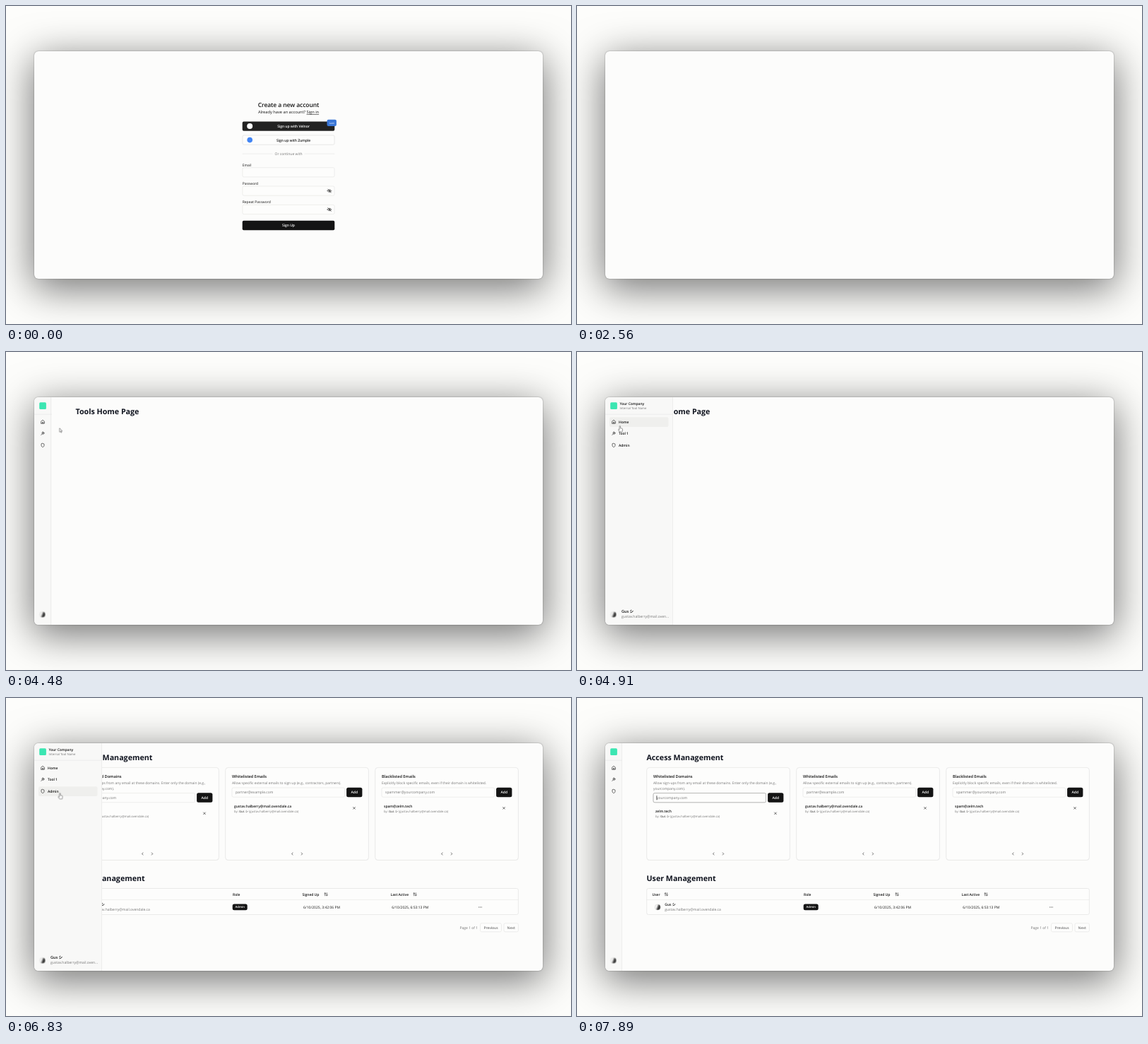
An HTML page for the animation above (8000 ms loop, 800x450 px).

```html
<!DOCTYPE html>
<html lang="en">
<head>
<meta charset="utf-8">
<title>Account sign-up</title>
<style>
html, body { margin: 0; width: 100%; height: 100%; overflow: hidden; background: #fdfdfb; }
.stage { position: relative; width: 800px; height: 450px; overflow: hidden; }
.window {
  position: absolute; left: 40px; top: 64px; width: 720px; height: 322px; border-radius: 6px;
  background: #fcfcfb;
  box-shadow: 0 12px 56px 2px rgba(0,0,0,.55), 0 0 2px rgba(0,0,0,.4);
}
svg { position: absolute; left: 0; top: 0; }
text {
  font-family: "Open Sans", "Noto Sans", "Noto Sans CJK JP", "Noto Sans CJK", sans-serif;
  font-size: 5px; fill: #161616; text-rendering: geometricPrecision; white-space: pre;
}
.b { font-weight: 600; letter-spacing: -.01em; }
.h { font-weight: 700; font-size: 10.7px; fill: #10141f; }
.t { font-size: 5.65px; }
.s { font-size: 4.25px; }
.g { fill: #737373; }
.w { fill: #fff; }
.m { text-anchor: middle; }
.field { fill: #fdfdfc; stroke: #e2e2e1; stroke-width: .6; }
.rule { stroke: #e4e4e3; stroke-width: .6; }
.ink { fill: #141414; }
.icon { fill: none; stroke: #222; stroke-width: .65; stroke-linecap: round; stroke-linejoin: round; }

/* one shared 8 s timeline: 1% = 80 ms */
.a { animation: 8s step-end infinite; }
.form { animation-name: form; }
.idle { animation-name: idle; animation-timing-function: linear; }
.busy { animation-name: busy; animation-timing-function: linear; }
.wait { animation-name: wait; }
.app { animation-name: app; }
.late { animation-name: late; animation-timing-function: linear; }
.home { animation-name: home; }
.admin { animation-name: admin; }
.rows { animation-name: rows; }
.hover { animation-name: hover; }
.focus { animation-name: focus; }
.open { animation-name: open; }
.edge { animation-name: edge; }
.label { animation-name: label; animation-timing-function: linear; }
.move { animation-name: move; }
.arrow { animation-name: arrow; }
.hand { animation-name: hand; }
.beam { animation-name: beam; }
.spin { animation: spin 1s linear infinite; }

@keyframes spin { to { transform: rotate(360deg); } }
@keyframes form { 0% { opacity: 1; } 26.875%, 100% { opacity: 0; } }
@keyframes idle { 0%, 9.3% { opacity: 1; } 10.6%, 100% { opacity: 0; } }
@keyframes busy { 0%, 9.3% { opacity: 0; } 10.6%, 100% { opacity: 1; } }
@keyframes wait { 0% { opacity: 0; } 26.875% { opacity: 1; } 32%, 100% { opacity: 0; } }
@keyframes app { 0% { opacity: 0; } 36.625%, 100% { opacity: 1; } }
@keyframes late { 0%, 39.3% { opacity: 0; } 40.6%, 100% { opacity: 1; } }
@keyframes home { 0% { opacity: 0; } 36.625% { opacity: 1; } 80%, 100% { opacity: 0; } }
@keyframes admin { 0% { opacity: 0; } 80%, 100% { opacity: 1; } }
@keyframes rows { 0% { opacity: 0; } 81.375%, 100% { opacity: 1; } }
@keyframes hover {
  0% { opacity: 0; transform: translateY(0); }
  56.5% { opacity: 1; transform: translateY(0); }
  64.2% { opacity: 1; transform: translateY(16.5px); }
  65.9% { opacity: 1; transform: translateY(33px); }
  90.2%, 100% { opacity: 0; transform: translateY(33px); }
}
@keyframes focus { 0% { opacity: 0; } 96%, 100% { opacity: 1; } }
@keyframes open {
  0% { width: 24px; }
  56% { width: 24px; animation-timing-function: ease-in-out; }
  58.8% { width: 96px; }
  91.2% { width: 96px; animation-timing-function: ease-in-out; }
  94.4%, 100% { width: 24px; }
}
@keyframes edge {
  0% { transform: translateX(0); }
  56% { transform: translateX(0); animation-timing-function: ease-in-out; }
  58.8% { transform: translateX(72px); }
  91.2% { transform: translateX(72px); animation-timing-function: ease-in-out; }
  94.4%, 100% { transform: translateX(0); }
}
@keyframes label { 0%, 56.2% { opacity: 0; } 58.8%, 91.2% { opacity: 1; } 94%, 100% { opacity: 0; } }
@keyframes move {
  0% { transform: translate(370.5px, 169.3px); }
  48% { transform: translate(360px, 166.8px); animation-timing-function: ease-in-out; }
  57.5% { transform: translate(61px, 104.6px); }
  62.5% { transform: translate(61px, 104.6px); animation-timing-function: ease-in-out; }
  67.8% { transform: translate(76.5px, 134.6px); }
  85.375% { transform: translate(76.5px, 134.6px); animation-timing-function: ease-in-out; }
  95%, 100% { transform: translate(196px, 141px); }
}
@keyframes arrow {
  0% { opacity: 0; } 6% { opacity: 1; } 26.875% { opacity: 0; }
  48% { opacity: 1; } 56.5% { opacity: 0; } 90.2% { opacity: 1; } 92.4%, 100% { opacity: 0; }
}
@keyframes hand { 0% { opacity: 0; } 56.5% { opacity: 1; } 90.2%, 100% { opacity: 0; } }
@keyframes beam { 0% { opacity: 0; } 92.4% { opacity: 1; } 96%, 100% { opacity: 0; } }
</style>
</head>
<body>
<div class="stage">
<div class="window"></div>
<svg width="800" height="450" viewBox="0 0 800 450">
  <defs>
    <clipPath id="side"><rect class="a open" x="40" y="64" width="24" height="322"/></clipPath>
    <linearGradient id="tone" x1="0" y1="0" x2="1" y2=".4">
      <stop offset=".4" stop-color="#f4f4f3"/>
      <stop offset=".75" stop-color="#3a3a3a"/>
    </linearGradient>
    <g id="eye" class="icon">
      <path d="M-2.8 0C-1.5-2.3 1.5-2.3 2.8 0C1.5 2.3-1.5 2.3-2.8 0zM-2.3-2.4L2.3 2.4"/>
      <circle r=".9"/>
    </g>
    <path id="ring" fill="none" stroke-width=".7" stroke-linecap="round" d="M2.2 1.1A2.45 2.45 0 1 1 1.1 2.2"/>
    <path id="sort" class="icon" d="M-1.2 2V-2M-2.2-1L-1.2-2L-.2-1M1.3-2V2M.3 1L1.3 2L2.3 1"/>
    <path id="cross" class="icon" d="M-1.4-1.4L1.4 1.4M1.4-1.4L-1.4 1.4"/>
    <circle id="face" r="4" fill="url(#tone)" stroke="#c4c4c3" stroke-width=".4"/>
    <g id="panel">
      <rect x="98.7" y="98.9" width="202.8" height="131.2" rx="4" fill="#000" opacity=".05"/>
      <rect class="field" x="98.7" y="98.4" width="202.7" height="131" rx="4" style="stroke:#dededd"/>
      <path class="icon" d="M194-1.5L192.6 0L194 1.5M206.3-1.5L207.7 0L206.3 1.5" transform="translate(0 220.5)"/>
    </g>
    <g id="adder">
      <rect class="field" x="108" y="134.6" width="159.6" height="13.2" rx="2"/>
      <rect class="ink" x="270.1" y="134.3" width="22.3" height="13.5" rx="2.5"/>
      <text class="b w m" x="281.3" y="142.9">Add</text>
    </g>
    <g id="owner">
      <text class="s g" x="111" y="169.1">by: <tspan fill="#222">Gus シ</tspan> (gustav.halberry@mail.ovendale.ca)</text>
      <use href="#cross" x="281" y="163.3"/>
    </g>
  </defs>

  <g class="a form">
    <text class="b m" x="400" y="143" style="font-size:8.5px">Create a new account</text>
    <text class="m" x="400" y="152.2" style="font-size:5.7px">Already have an account? <tspan text-decoration="underline">Sign in</tspan></text>

    <g class="a idle">
      <rect x="334.7" y="163.4" width="130.6" height="13.4" rx="2" fill="#222"/>
      <circle cx="345.2" cy="170.1" r="4" fill="#fff"/>
      <text class="b w m" x="407" y="172">Sign up with Velnor</text>
      <rect x="454.5" y="160.7" width="13.4" height="9.2" rx="2" fill="#3a76d6"/>
      <text class="w m" x="461.2" y="166.6" style="font-size:3.7px">Last</text>
    </g>
    <g class="a busy">
      <rect x="334.7" y="163.4" width="130.6" height="13.4" rx="2" fill="#848483"/>
      <g transform="translate(400 170)"><use class="spin" href="#ring" stroke="#d6d6d6"/></g>
    </g>

    <rect class="field" x="334.9" y="183" width="130.2" height="13.2" rx="2" style="stroke:#dadad9"/>
    <circle cx="345.2" cy="189.6" r="3.8" fill="#4285f4"/>
    <text class="b m" x="407" y="191.5">Sign up with Zumple</text>

    <path class="rule" d="M334.7 209.2H377.5M422.5 209.2H465.3"/>
    <text class="g m" x="400" y="211">Or continue with</text>

    <text x="334.7" y="226.7">Email</text>
    <rect class="field" x="334.9" y="228.7" width="130.2" height="13.2" rx="2"/>
    <text x="334.7" y="252.9">Password</text>
    <rect class="field" x="334.9" y="255" width="130.2" height="13.2" rx="2"/>
    <use href="#eye" x="458" y="261.6"/>
    <text x="334.7" y="279.2">Repeat Password</text>
    <rect class="field" x="334.9" y="281.4" width="130.2" height="13.2" rx="2"/>
    <use href="#eye" x="458" y="288"/>

    <rect class="ink" x="334.7" y="303.8" width="130.6" height="13.4" rx="2"/>
    <text class="b w m" x="400" y="312.4">Sign Up</text>
  </g>

  <g class="a wait"><g transform="translate(400 225) scale(1.3)"><use class="spin" href="#ring" stroke="#777"/></g></g>

  <text class="h a home" x="98.5" y="87.5">Tools Home Page</text>

  <g class="a admin">
    <text class="h" x="98.5" y="87.5">Access Management</text>
    <use href="#panel"/>
    <use href="#panel" x="212"/>
    <use href="#panel" x="424"/>
    <use href="#adder"/>
    <use href="#adder" x="212" y="-7.6"/>
    <use href="#adder" x="424" y="-7.6"/>

    <text class="b t" x="108" y="113.2">Whitelisted Domains</text>
    <text class="g" x="108" y="122" style="font-size:4.93px">Allow sign-ups from any email at these domains. Enter only the domain (e.g.,</text>
    <text class="g" x="108" y="129.8" style="font-size:4.93px">yourcompany.com).</text>
    <text class="g" x="113" y="142.9">yourcompany.com</text>

    <text class="b t" x="320" y="113.2">Whitelisted Emails</text>
    <text class="g" x="320" y="122" style="font-size:4.93px">Allow specific external emails to sign up (e.g., contractors, partners).</text>
    <text class="g" x="325" y="135.3">partner@example.com</text>

    <text class="b t" x="532" y="113.2">Blacklisted Emails</text>
    <text class="g" x="532" y="122" style="font-size:4.93px">Explicitly block specific emails, even if their domain is whitelisted.</text>
    <text class="g" x="537" y="135.3">spammer@yourcompany.com</text>

    <text class="h" x="98.5" y="258.6">User Management</text>
    <rect class="field" x="98.7" y="269.5" width="626.7" height="37" rx="2.5" style="stroke:#dededd"/>
    <path class="rule" d="M98.7 285.6H725.4"/>
    <text class="b" x="106.5" y="279.8">User</text>
    <text class="b" x="321" y="279.8">Role</text>
    <text class="b" x="419.5" y="279.8">Signed Up</text>
    <text class="b" x="544.5" y="279.8">Last Active</text>
    <use href="#sort" x="126.3" y="277.8"/>
    <use href="#sort" x="453" y="277.8"/>
    <use href="#sort" x="579" y="277.8"/>

    <text class="g" x="642.5" y="326.7">Page 1 of 1</text>
    <rect class="field" x="671.5" y="318.8" width="30" height="12" rx="2"/>
    <text class="b g m" x="686.5" y="326.7">Previous</text>
    <rect class="field" x="705" y="318.8" width="20.4" height="12" rx="2"/>
    <text class="b g m" x="715.2" y="326.7">Next</text>
  </g>

  <g class="a rows">
    <text class="b" x="111" y="162.4">zelm.tech</text>
    <use href="#owner"/>
    <text class="b" x="323" y="154.9">gustav.halberry@mail.ovendale.ca</text>
    <use href="#owner" x="212" y="-7.5"/>
    <text class="b" x="535" y="154.9">spam@zelm.tech</text>
    <use href="#owner" x="424" y="-7.5"/>

    <use href="#face" x="114.2" y="296"/>
    <text class="b" x="124.3" y="294.2">Gus シ</text>
    <text class="g" x="124.3" y="301.4">gustav.halberry@mail.ovendale.ca</text>
    <rect class="ink" x="320.7" y="291.6" width="21" height="8.6" rx="2.5"/>
    <text class="b w m s" x="331.2" y="297.4">Admin</text>
    <text x="421" y="297.8">6/10/2025, 3:42:06 PM</text>
    <text x="546.3" y="297.8">6/10/2025, 6:53:13 PM</text>
    <path class="icon" d="M669.7 296h0M671.5 296h0M673.3 296h0" style="stroke-width:1"/>
  </g>

  <g class="a focus">
    <rect x="108" y="134.6" width="159.6" height="13.2" rx="2" fill="none" stroke="#a2a2a1" stroke-width=".7"/>
    <path d="M112.9 138.2V144.2" stroke="#111" stroke-width=".7"/>
  </g>

  <g class="a app">
    <g clip-path="url(#side)">
      <path d="M46 64H136V386H46a6 6 0 0 1-6-6V70a6 6 0 0 1 6-6z" fill="#f8f8f7"/>
      <path class="rule" d="M40 88.2H136"/>
      <rect class="a hover" x="46" y="92.2" width="83.5" height="13.8" rx="2" fill="#efefed"/>
      <rect class="a late" x="47.2" y="71.3" width="9.7" height="9.7" rx="1.6" fill="#3ce6b2"/>
      <g class="icon">
        <path d="M49.6 98.2L52 96.2L54.4 98.2V101.1H49.6zM51.2 101V99.3H52.8V101"/>
        <path d="M49.8 117.4L52 115.2M54.2 114.5A1.6 1.6 0 1 1 52.8 113L52.6 114.4z"/>
        <path d="M52 129.4L54 130.2V132.2C54 133.4 53.2 134.2 52 134.6C50.8 134.2 50 133.4 50 132.2V130.2z"/>
      </g>
      <use class="a late" href="#face" x="51.6" y="371.5"/>
      <g class="a label">
        <text class="b" x="60.5" y="75.2">Your Company</text>
        <text class="s g" x="60.5" y="81.2">Internal Tool Name</text>
        <text class="b" x="59" y="100.9">Home</text>
        <text class="b" x="59" y="117.4">Tool 1</text>
        <text class="b" x="59" y="133.9">Admin</text>
        <text class="b" x="63" y="369.3" style="font-size:5.6px">Gus シ</text>
        <text class="g" x="63" y="375.6">gustav.halberry@mail.oven...</text>
      </g>
    </g>
    <path class="rule a edge" d="M63.7 64V386"/>
  </g>

  <g class="a move" stroke="#333" stroke-width=".5" stroke-linejoin="round" fill="#fff">
    <path class="a arrow" d="M0 0V5.6L1.3 4.4L2.2 6.4L3.1 6L2.2 4.1H3.9z"/>
    <path class="a hand" d="M-.9 .8A.75 .75 0 0 1 .6 .8V3.2L3 3.7Q3.7 3.9 3.6 4.7L3.1 8.2H-.8L-2.6 5.4Q-2.5 4.5-1.6 4.9L-.9 5.4z"/>
    <path class="a beam" d="M-1.2-3H1.2M0-3V3M-1.2 3H1.2" fill="none"/>
  </g>
</svg>
</div>
</body>
</html>
```
